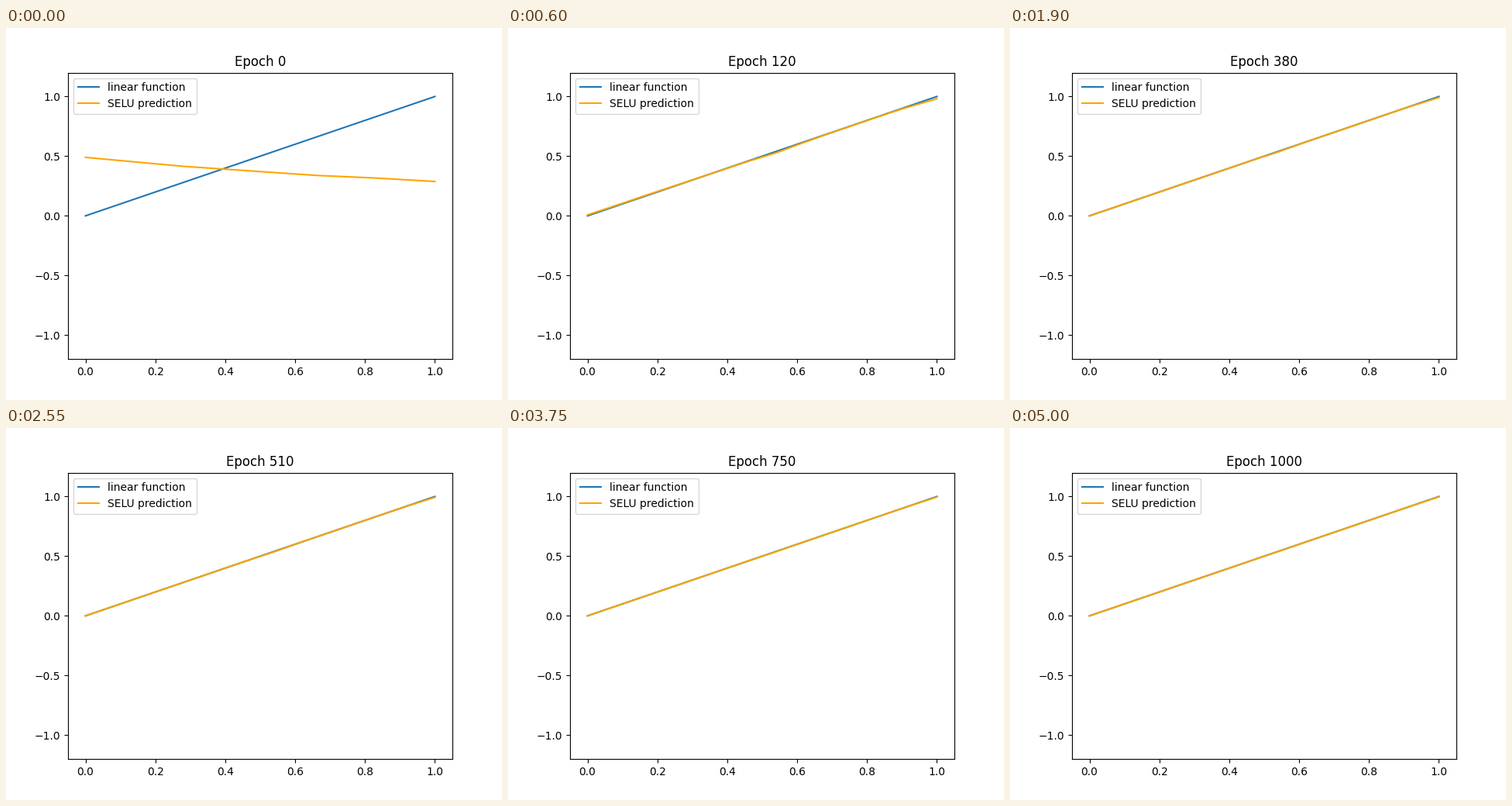
Animation, 640 px wide and 480 px high, one loop 5050 ms. Source, as a matplotlib script:

```python
import numpy as np
import matplotlib.pyplot as plt
from matplotlib.animation import FuncAnimation

FRAMES = 101
STEP = 10  # epochs per frame
SWING = 5  # frames until the first rough fit

x = np.linspace(0, 1, 101)


def bend(*points):
    """Error against y = x of a line bent at the given points."""
    px, py = zip(*points)
    return np.interp(x, px, py) - x


untrained = bend((0, .49), (.28, .415), (.66, .339), (.83, .317), (1, .288))
rough = bend((0, .045), (.1, .131), (.18, .207), (.54, .508),
             (.63, .604), (.71, .702), (.83, .819), (1, .96))

# Last flaws to vanish: a drooping end and a small dip past the middle
droop = np.clip((x - .9) / .1, 0, 1)
dip = np.clip(1 - abs(x - .54) / .08, 0, 1)
flaw = -.018 * (droop + dip / 2)


def error(i):
    if i < SWING:
        t = i / SWING
        swing = (1 - t) * np.exp(-i / 2) * np.cos(np.pi * i / 3)
        return swing * untrained + t ** 2 * rough
    fade = np.exp(-(i - SWING) / 4)
    return fade * rough + (1 - fade) * np.exp(-i / 55) * flaw


fig, ax = plt.subplots(figsize=(6.4, 4.8), dpi=100)
ax.plot(x, x, label="linear function")
line, = ax.plot(x, x + error(0), color="orange", label="SELU prediction")
ax.set_xlim(-.05, 1.05)
ax.set_ylim(-1.2, 1.2)
ax.legend(loc="upper left")
title = ax.set_title("Epoch 0")


def update(i):
    line.set_ydata(x + error(i))
    title.set_text(f"Epoch {i * STEP}")
    return line, title


anim = FuncAnimation(fig, update, frames=FRAMES, interval=50,
                     repeat=True, repeat_delay=0, blit=False)
plt.show()
```
